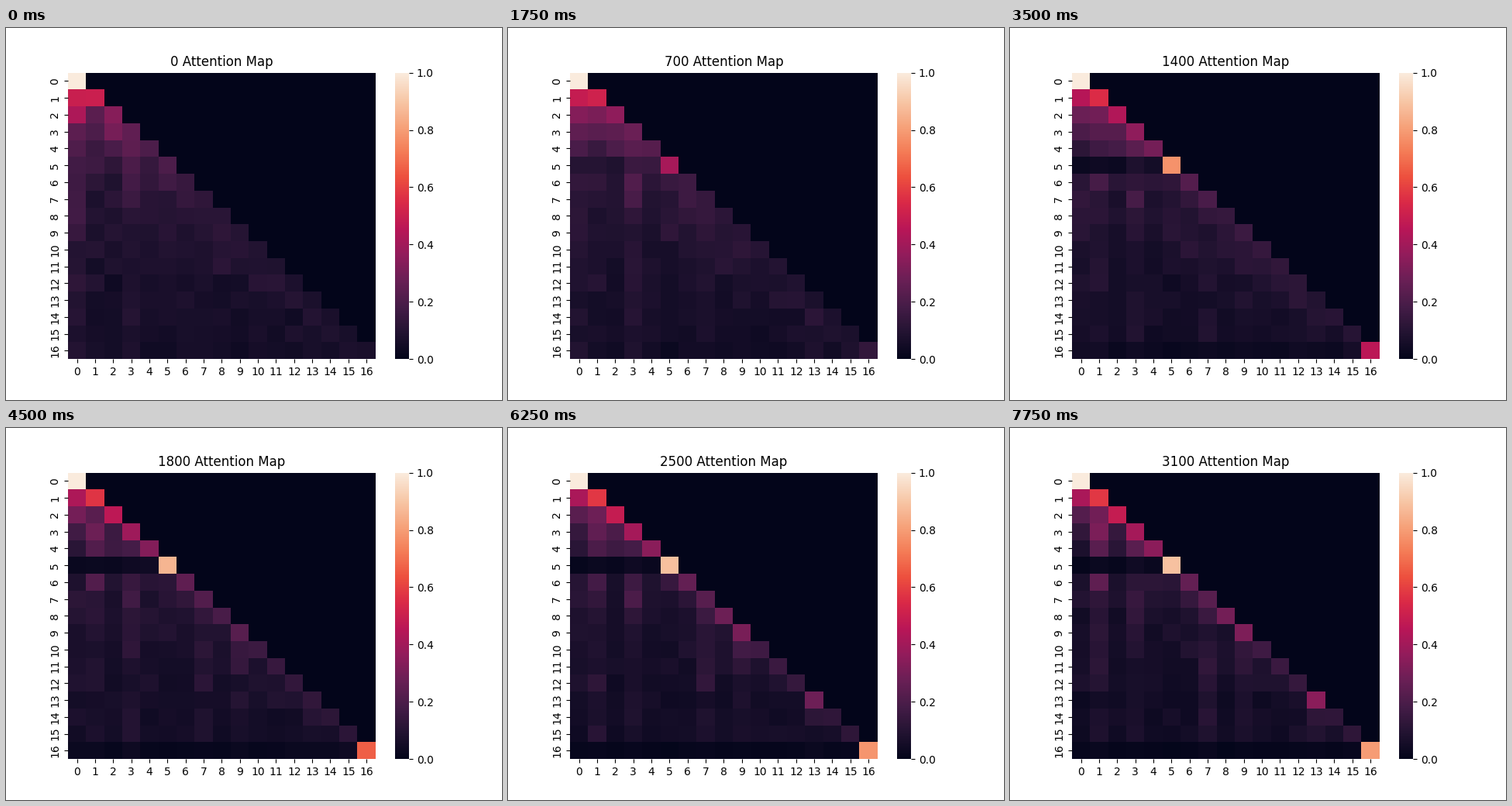
Recreate the animation shown at these times as a matplotlib script. Size 640x480 px, loop 8 s.

```python
import numpy as np
import matplotlib.pyplot as plt
from matplotlib.animation import FuncAnimation
from matplotlib.colors import LinearSegmentedColormap, to_rgb

SIZE = 17
FRAMES = 32
INTERVAL = 250

RAMP = ["#03051a", "#221331", "#451c47", "#691f55", "#921c5b", "#b91657",
        "#d92847", "#ed503e", "#f47d57", "#f6a47c", "#f7c9aa", "#faebdd"]
cmap = LinearSegmentedColormap.from_list("warm", [to_rgb(c) for c in RAMP], N=256)

# Tokens that learn to attend to themselves: final weight, step halfway there.
LEARNERS = {5: (.89, 9), 8: (.3, 19), 9: (.32, 17), 13: (.36, 22), 16: (.8, 13.5)}
POPULAR = [1, 3, 7, 9, 13]

rows, cols = np.indices((SIZE, SIZE))
index = np.arange(SIZE)
goal = .6 * np.exp(-.22 * index) + .1
middle = np.full(SIZE, 12.0)
for token, (weight, step) in LEARNERS.items():
    goal[token], middle[token] = weight, step

early = np.ones(SIZE)
early[[0, 3]] = 1.6, 1.4
late = np.full(SIZE, .8)
late[POPULAR] = 1.5
nearness = 1 + .5 * np.exp((cols - rows + 1) / 2)

rng = np.random.default_rng(7)
cell_bias = rng.normal(0, .12, (SIZE, SIZE))
step_noise = rng.normal(0, .15, (FRAMES, SIZE, SIZE))


def attention(step):
    """Lower-triangular map whose rows each sum to one."""
    learned = 1 / (1 + np.exp((middle - step) / 3))
    even = 1 / (index + 1)
    own = even + (goal - even) * learned
    own[0] = 1

    pull = early + (late - early) * step / FRAMES
    others = np.tril(pull * nearness * np.exp(cell_bias + step_noise[step]), -1)
    others[1:] *= (1 - own[1:, None]) / others[1:].sum(axis=1, keepdims=True)
    return others + np.diag(own)


fig, ax = plt.subplots(figsize=(6.4, 4.8), dpi=100)
mesh = ax.pcolormesh(attention(0), cmap=cmap, vmin=0, vmax=1)
ax.set(xlim=(0, SIZE), ylim=(SIZE, 0))
bar = fig.colorbar(mesh, ax=ax)
bar.outline.set_linewidth(0)
ax.spines[:].set_visible(False)

ax.set_xticks(index + .5, index)
ax.set_yticks(index + .5, index, rotation="vertical", va="center")
title = ax.set_title("0 Attention Map")


def update(step):
    mesh.set_array(attention(step))
    title.set_text(f"{step * 100} Attention Map")
    return mesh, title


anim = FuncAnimation(fig, update, frames=FRAMES, interval=INTERVAL, repeat=True,
                     repeat_delay=0)
plt.show()
```
